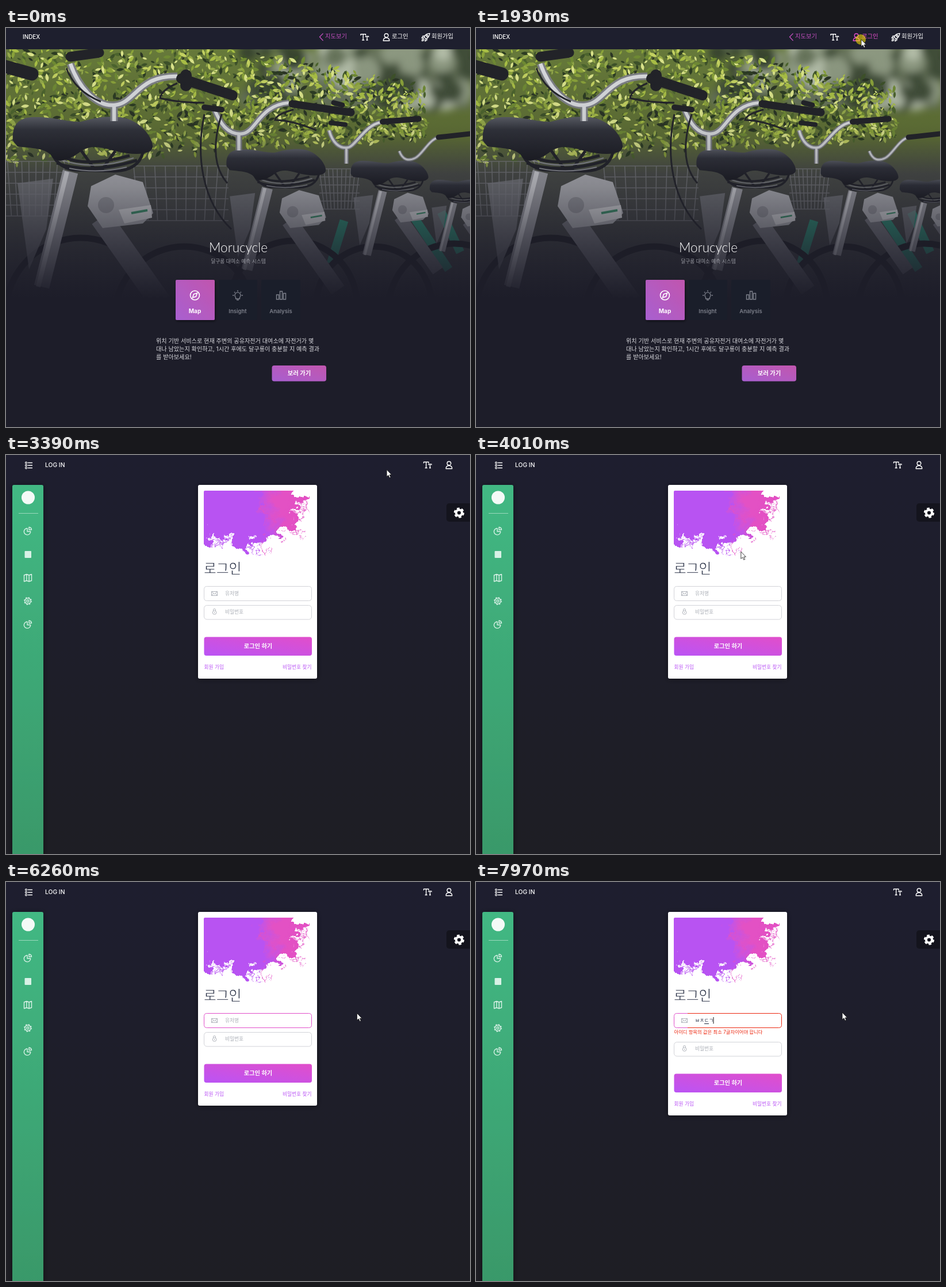
An HTML page for the animation above (8 s loop, 807 px wide and 694 px high).

```html
<!DOCTYPE html>
<html lang="ko">
<head>
<meta charset="utf-8">
<style>
html, body { margin: 0; width: 100%; height: 100%; overflow: hidden; background: #1e1e28; }
svg { display: block; width: 807px; height: 694px; }
text { font-family: Inter, "Noto Sans CJK KR", "Noto Sans CJK", sans-serif; white-space: pre; }
.icon { fill: none; stroke: currentColor; stroke-width: 1.4; stroke-linejoin: round; }
</style>
</head>
<body>
<svg id="stage" viewBox="0 0 807 694">
<defs>
  <linearGradient id="page" x2="0" y2="1"><stop stop-color="#1e1e2f"/><stop offset="1" stop-color="#1e1e24"/></linearGradient>
  <linearGradient id="side" gradientUnits="userSpaceOnUse" x1="0" y1="52" x2="0" y2="790"><stop stop-color="#42b883"/><stop offset="1" stop-color="#389466"/></linearGradient>
  <linearGradient id="bright" y1="1" x2="1" y2="0"><stop stop-color="#ba54f5"/><stop offset="1" stop-color="#e14eca"/></linearGradient>
  <linearGradient id="soft" y1="1" x2="1" y2="0"><stop stop-color="#a85fd0"/><stop offset="1" stop-color="#c156ae"/></linearGradient>
  <linearGradient id="ink" gradientUnits="userSpaceOnUse" x1="438" y1="110" x2="478" y2="98"><stop stop-color="#b853f2"/><stop offset="1" stop-color="#e351c4"/></linearGradient>
  <linearGradient id="hedge" x2="0" y2="1"><stop stop-color="#66793a"/><stop offset=".35" stop-color="#5f7034"/><stop offset=".5" stop-color="#4b4e48"/><stop offset="1" stop-color="#393a40"/></linearGradient>
  <linearGradient id="fade" x2="0" y2="1">
    <stop stop-color="#1d1d29" stop-opacity="0"/><stop offset=".3" stop-color="#1d1d29" stop-opacity=".08"/>
    <stop offset=".55" stop-color="#1d1d29" stop-opacity=".32"/><stop offset=".8" stop-color="#1d1d29" stop-opacity=".72"/>
    <stop offset="1" stop-color="#1d1d29"/>
  </linearGradient>
  <linearGradient id="seatTone" x2="0" y2="1"><stop stop-color="#5b5e66"/><stop offset=".3" stop-color="#30323a"/><stop offset="1" stop-color="#1a1b21"/></linearGradient>
  <filter id="blur"><feGaussianBlur stdDeviation="7"/></filter>
  <filter id="shadow" x="-30%" y="-30%" width="160%" height="160%"><feDropShadow dx="0" dy="1" stdDeviation="5" flood-opacity=".45"/></filter>
  <filter id="lift" x="-20%" y="-20%" width="140%" height="140%"><feDropShadow dx="1" dy="2" stdDeviation="2" flood-opacity=".5"/></filter>
  <filter id="ragged" x="-20%" y="-20%" width="140%" height="140%">
    <feTurbulence type="fractalNoise" baseFrequency=".055" numOctaves="4" seed="8"/>
    <feDisplacementMap in="SourceGraphic" scale="48" xChannelSelector="R" yChannelSelector="G"/>
  </filter>
  <clipPath id="photoClip"><path d="M0 37H807V470H0z"/></clipPath>
  <clipPath id="inkClip"><path d="M344 64q0-2 2-2H528V177H344z"/></clipPath>

  <g id="type" class="icon"><path d="M-6.5-3v-2.2H2V-3M-2.3-5V5M-4.3 5h4M2 0v-1.6h5V0M4.5-1.6V5M3 5h3"/></g>
  <g id="person" class="icon"><circle cy="-3" r="3.3"/><path d="M-5.3 6.3C-5.3 2.5-3 1 0 1S5.3 2.5 5.3 6.3z"/></g>
  <g id="rocket" class="icon"><path d="M-3-.5C0-5.500 3-6.500 7-6.500 6.500-2.500 5 1 .5 3zM-2-2h-3L-7 1.500l4-.5M2 2v3L-1 7l.5-3.500M-3.500 3c-2 0-3 1.500-3 3.500 2 0 3.500-1 3.500-3"/><circle cx="2.500" cy="-2" r="1.500"/></g>
  <g id="pie" class="icon"><path d="M-1-4.5A5.7 5.7 0 1 0 4.7 1H-1zM2-6.5A5 5 0 0 1 6.5-2H2z"/></g>
  <g id="fold" class="icon"><path d="M-6.5-4.5-2.2-6 2.1-4.5 6.5-6V5L2.1 6.5-2.2 5-6.5 6.5zM-2.2-6V5M2.1-4.5v11"/></g>
  <g id="cog" class="icon"><circle r="2"/><circle r="5"/><circle r="6.2" stroke-dasharray="2.4 2.47"/></g>
  <g id="gear" fill="none" stroke="#fff"><circle r="5.1" stroke-width="4"/><circle r="7.6" stroke-width="3" stroke-dasharray="4.5 3.46"/></g>

  <g id="seat">
    <path d="M75 205q10 38 45 42l70 2q40-2 48-32M95 222q40 22 120 0M88 235q60 20 140-5M130 212l25 35M190 214l-25 35" fill="none" stroke="#222329" stroke-width="5"/>
    <path d="M92 228q60 22 130-2M110 244q50 10 100-2" fill="none" stroke="#8d8f95" stroke-width="2"/>
    <path fill="url(#seatTone)" d="M12 196C10 170 20 157 45 155 85 154 100 163 130 163 160 154 190 151 212 158 240 168 257 195 255 208 250 222 220 221 190 214 160 206 150 204 132 213 112 229 92 236 82 226 72 208 42 209 20 206Z"/>
  </g>
  <g id="frame">
    <path d="M165 330 285 500" stroke="#7c7d83" stroke-width="38"/>
    <path d="M112 250 62 450" stroke="#a4a5aa" stroke-width="27"/><path d="M106 250 56 450" stroke="#dcdde0" stroke-width="8"/>
    <path d="M20 270 82 262 70 350 40 420z" fill="#87888e" opacity=".7"/>
    <path d="M148 275 190 255 238 268 256 322 238 340 168 348 142 310z" fill="#b9babe"/>
    <path d="M196 316 252 308 254 330 206 340z" fill="#e6e7e8"/><path d="M218 322l28-5" stroke="#3f9b70" stroke-width="4"/>
    <circle cx="174" cy="308" r="14" fill="#9a9ba0"/>
  </g>
</defs>
<rect width="807" height="694" fill="url(#page)"/>
<g id="home"></g>
<g id="login"></g>
<circle id="click" r="9" fill="#ffe900" fill-opacity=".55"/>
<path id="arrow" d="M0 0V12.3L2.9 9.7 4.9 14.2 6.9 13.3 5 9H8.6Z" fill="#fff" stroke="#111" stroke-width=".8"/>
<path id="beam" d="M-2.5-5.5H-.7L0-5 .7-5.5H2.5M0-5V5M-2.5 5.5H-.7L0 5 .7 5.5H2.5" fill="none" stroke="#222"/>
</svg>
<script>
const $ = id => document.getElementById(id);
let seed = 7;
const rnd = () => (seed = seed * 16807 % 2147483647) / 2147483647;
const range = (a, b) => a + (b - a) * rnd();
const pick = list => list[rnd() * list.length | 0];
const many = (n, make) => Array.from({ length: n }, make).join('');
const text = (x, y, size, str, fill = '#fff', more = '') =>
  `<text x="${x}" y="${y}" font-size="${size}" fill="${fill}" ${more}>${str}</text>`;
const box = (x, y, w, h, r, fill, more = '') =>
  `<rect x="${x}" y="${y}" width="${w}" height="${h}" rx="${r}" fill="${fill}" ${more}/>`;
const icon = (id, x, y, color = '#fff') =>
  `<use href="#${id}" transform="translate(${x} ${y})" color="${color}"/>`;
const line = (d, color, width, more = '') =>
  `<path d="${d}" fill="none" stroke="${color}" stroke-width="${width}" ${more}/>`;
const MID = 'text-anchor="middle"', BOLD = 'text-anchor="middle" font-weight="700"';

// Row of parked bikes in front of a hedge
const SHADE = ['#2c3c22', '#3d5129', '#4c642d', '#2a3424'];
const LIGHT = ['#a9bf45', '#c3d160', '#8aa23a', '#6f8a34', '#dbe48a', '#94a94a'];
const BLUR = ['#39442f', '#66735a', '#8c9880', '#414d37', '#b3bda8'];
const leaf = colors => {
  const x = range(-10, 730), top = 37 + Math.max(0, x - 400) * .2;
  const y = range(top, 235 - x * .06), s = range(3, 8);
  return `<path d="M0 0Q${s} ${-s * .8} ${2 * s} 0 ${s} ${s * .8} 0 0" fill="${pick(colors)}"
    transform="translate(${x} ${y}) rotate(${range(0, 360)})"/>`;
};
const blob = () => `<circle cx="${range(420, 807)}" cy="${range(30, 130)}" r="${range(10, 26)}" fill="${pick(BLUR)}"/>`;
const tube = (d, w) => line(d, '#7d7f85', w) + line(d, '#d8dadd', w * .5);
const grip = (d, w) => line(d, '#222328', w, 'stroke-linecap="round"');
const basket = (x, y, w, h) => {
  let d = '';
  for (let i = 0; i <= 9; i++) d += `M${x + w * i / 9} ${y}l${(4.5 - i) * 2} ${h}`;
  for (let i = 0; i <= 5; i++) d += `M${x} ${y + h * i / 5}h${w}`;
  return line(d, '#85878b', 1.6, 'opacity=".7"');
};
const wheel = ([x, y, r]) => `<circle cx="${x}" cy="${y}" r="${r}" fill="none" stroke="#1c1d22" stroke-width="11"/>`;
const BIKES = ['732 199) scale(.42)', '593 145) scale(.555)', '375 101) scale(.71)', '0 0)'];
const photo = `<g clip-path="url(#photoClip)">
  ${box(0, 37, 807, 433, 0, 'url(#hedge)')}
  <g filter="url(#blur)">${box(540, 30, 267, 110, 0, '#66725a')}${many(80, blob)}</g>
  ${many(700, () => leaf(SHADE))}${many(1300, () => leaf(LIGHT))}
  ${basket(-10, 232, 112, 95)}${basket(222, 240, 165, 95)}${basket(545, 245, 70, 70)}
  ${line('M588 335 565 410M690 300 770 420M757 320 790 390', '#2d967a', 15)}
  ${[[130, 495, 130], [310, 500, 120], [500, 480, 110], [640, 480, 100], [780, 490, 115]].map(wheel).join('')}
  ${BIKES.map(at => `<g transform="translate(${at}"><use href="#frame"/><use href="#seat"/></g>`).join('')}
  ${tube('M112 62C125 100 155 138 190 134S230 82 298 84M188 132V162', 13)}
  ${tube('M362 140C372 165 385 186 410 184S440 134 492 130M405 183V213', 11)}
  ${tube('M562 178C568 200 580 210 594 208S625 168 652 164M592 207V236', 8)}
  ${tube('M684 214C690 230 700 232 712 226S735 195 752 190', 6)}
  ${grip('M-5 66 45 80', 23)}${grip('M112 50 162 43', 17)}${grip('M305 88 394 117', 18)}${grip('M313 82V100', 20)}
  ${grip('M345 138 375 142', 10)}${grip('M498 132 600 147', 13)}${grip('M570 130 585 134', 9)}
  ${grip('M655 163 718 158', 10)}${grip('M565 165 590 168', 8)}${grip('M752 190 807 184', 9)}
  ${line('M298 96Q270 108 268 122 300 130 345 130M105 70Q120 110 165 128M345 150C330 220 340 300 392 350M375 150Q350 230 385 270M500 142Q470 150 468 160 495 160 540 178', '#24252a', 3)}
  ${box(0, 37, 807, 434, 0, 'url(#fade)')}
</g>`;

const INK = '#d9d9de', DIM = '#7d808b';
$('home').innerHTML = box(0, 37, 807, 657, 0, '#1d1d29') + photo + box(0, 0, 807, 37, 0, '#1e1f2e') +
  text(29, 19, 9.9, 'INDEX', '#fff', 'font-weight="500"') +
  line('M551.5 9.5 545.5 15.5 551.5 22', '#c44fc0', 1.3) + text(555, 18, 10.3, '지도보기', '#c44fc0') +
  icon('type', 623.5, 16) + `<g id="hover">${icon('person', 661.5, 16, 'inherit')}${text(671, 18, 10.4, '로그인', 'currentColor')}</g>` +
  icon('rocket', 730, 16) + text(740, 18, 10.3, '회원가입') +
  text(404, 390, 22.5, 'Morucycle', '#fff', MID + ' font-weight="300" style="font-family:Lato,sans-serif"') +
  text(404, 408.5, 8.7, '달구롱 대여소 예측 시스템', '#9a9ba3', MID) +
  box(295, 438, 68, 70, 2, 'url(#soft)', 'filter="url(#lift)"') +
  box(370, 438, 67, 70, 2, '#1a1e2a') + box(444, 438, 68, 70, 2, '#1a1e2a') +
  line('M320.5 465a8 8 0 1 0 16 0 8 8 0 1 0-16 0zM332.5 461 330.5 467 324.5 469 326.5 463z', '#fff', 1.6) +
  line('M399.5 468.5A5 5 0 1 1 406.5 468.5V471H399.5zM401 473h4M403 456v2.5M394 465h2.5M409.5 465h2.5M397 459l1.5 1.5M409 459l-1.5 1.5', DIM, 1.3) +
  line('M470.5 464h4v8h-4zM476.5 458h4v14h-4zM482.5 461.5h4v10.5h-4z', DIM, 1.4) +
  text(328.5, 496, 10, 'Map', '#fff', BOLD) +
  text(403, 496, 9.5, 'Insight', DIM, MID + ' font-weight="600"') +
  text(478, 496, 9.5, 'Analysis', DIM, MID + ' font-weight="600"') +
  text(261, 547.5, 10.13, '위치 기반 서비스로 현재 주변의 공유자전거 대여소에 자전거가 몇', INK) +
  text(261, 561.5, 10.13, '대나 남았는지 확인하고, 1시간 후에도 달구롱이 충분할 지 예측 결과', INK) +
  text(261, 576, 10.13, '를 받아보세요!', INK) +
  box(462.5, 587, 94.5, 27.5, 4, 'url(#soft)') + text(510, 604, 10.3, '보러 가기', '#fff', BOLD);

// Login page
const MINT = '#d8f1e6', GREY = '#a9adb5', EDGE = [210, 211, 216], PINK = [225, 78, 202], RED = [236, 37, 13], WHITE = [255, 255, 255];
const tendril = () => {
  const x = range(350, 505), y = x < 450 ? range(125, 150) : range(75, 140);
  return line(`M${x} ${y}q${range(-8, 14)} ${range(5, 14)} ${range(-10, 26)} ${range(0, 26)}`,
    x < 445 ? '#b853f2' : '#e351c4', range(.6, 2.5), 'opacity=".7"');
};
$('login').innerHTML = box(0, 0, 807, 694, 0, 'url(#page)') +
  line('M38 13.5H46M38 18H46M38 22.5H46', '#fff', 1.5) +
  line('M35 12a1.5 1.5 0 1 0 .1 0M35 16.5a1.5 1.5 0 1 0 .1 0M35 21a1.5 1.5 0 1 0 .1 0', '#fff', 1.2) +
  text(68, 20.5, 10.3, 'LOG IN', '#fff', 'font-weight="500"') + icon('type', 733, 17.5) + icon('person', 770.5, 17.5) +
  box(11, 52, 54, 720, 3, 'url(#side)', 'filter="url(#shadow)"') +
  '<circle cx="38.5" cy="74" r="11.5" fill="#f4faf7"/>' + line('M22 101.5H56', '#9bd8bc', 1) +
  icon('pie', 38, 132, MINT) + box(32.5, 167, 11.5, 12, 1, MINT) + icon('fold', 38, 213.5, MINT) +
  icon('cog', 38, 254, MINT) + icon('pie', 38, 294.5, MINT) +
  box(766, 84, 50, 32, 5, '#14141d') + icon('gear', 788, 100.5) +
  box(334, 52, 207, 337, 3, '#fff', 'id="card" filter="url(#shadow)"') +
  `<g clip-path="url(#inkClip)"><g filter="url(#ragged)">
    <path fill="url(#ink)" d="M430 40H494L500 74 530 74 522 88 500 96 512 106 500 118 498 132 478 128 466 140 445 148 430 130z"/>
    <path fill="#b853f2" d="M320 40H440L436 78 450 96 442 118 446 146 430 152 412 166 396 160 388 140 372 148 362 130 352 150 320 148z"/>
    ${many(60, tendril)}</g></g>` +
  text(344, 206, 23.7, '로그인', '#1d253b', 'font-weight="100" stroke="#fff" stroke-width=".6"') +
  line('M368 228.5H526.5Q531.5 228.5 531.5 233.5V248.5Q531.5 253.5 526.5 253.5H368', '', 1, 'id="field"') +
  line('M368 228.5H349.5Q344.5 228.5 344.5 233.5V248.5Q344.5 253.5 349.5 253.5H368', '', 1, 'id="fieldIcon"') +
  line('M357.5 237.5h10v7h-10zl5 4.5 5-4.5M357.5 244.5l3.5-4M367.5 244.5l-3.5-4', GREY, .9) +
  text(381, 243.5, 8.7, '유저명', GREY, 'id="hint"') + text(381, 244, 8.7, '', '#222a42', 'id="typed"') +
  box(0, 246, 8, 1, 0, '#222a42', 'id="underline"') + box(0, 235, 1, 11.5, 0, '#111', 'id="caret"') +
  text(344.5, 263.5, 8.3, '아이디 항목의 값은 최소 7글자이어야 합니다', '#ec250d', 'id="error"') +
  '<g id="lower">' + box(344.5, 261.5, 187, 24.5, 5, 'none', `stroke="rgb(${EDGE})"`) +
  line('M360.5 271v-1.5a2 2 0 0 1 4 0V271M359.3 274a3.3 3.3 0 1 0 6.6 0 3.3 3.3 0 1 0-6.6 0M362.6 273v2', GREY, .9) +
  text(381, 275.5, 8.7, '비밀번호', GREY) + box(344.5, 316.5, 187.5, 32.5, 4, 'url(#bright)') +
  text(438.5, 335.5, 10.2, '로그인 하기', '#fff', BOLD) +
  text(344.5, 371.5, 8.7, '회원 가입', '#ba54f5') + text(531.5, 371.5, 8.7, '비밀번호 찾기', '#ba54f5', 'text-anchor="end"') + '</g>';

const PATH = [[460, 782, 700], [700, 760, 520], [950, 715, 230], [1150, 685, 80], [1300, 671, 32], [1580, 670, 20],
  [3320, 670, 20], [3500, 650, 34], [3800, 535, 115], [4010, 461, 168], [4150, 437, 188], [4560, 412, 240],
  [5700, 412, 240], [5850, 440, 238], [6150, 590, 230], [6400, 636, 226], [7430, 636, 226], [7500, 637, 227]];
const KEYS = [[0, ''], [6330, 'ㅂ'], [6470, 'ㅂㅈ'], [6540, 'ㅂㅈㄷ'], [6680, 'ㅂㅈㄷㄱ'], [6970, 'ㅂㅈㄷㄱㅅ'], [7970, 'ㅂㅈㄷㄱ']];

const clamp = v => Math.min(1, Math.max(0, v));
const mix = (a, b, k) => `rgb(${a.map((v, i) => Math.round(v + (b[i] - v) * clamp(k)))})`;
const set = (id, attrs) => { for (const k in attrs) $(id).setAttribute(k, attrs[k]); };
const show = (id, on) => { $(id).style.display = on ? '' : 'none'; };
const pointer = t => {
  const i = PATH.findIndex(p => p[0] > t);
  if (i <= 0) return PATH[i ? PATH.length - 1 : 0].slice(1);
  const a = PATH[i - 1], b = PATH[i], k = (t - a[0]) / (b[0] - a[0]);
  return [a[1] + (b[1] - a[1]) * k, a[2] + (b[2] - a[2]) * k];
};

function draw(t) {
  const login = t >= 2000, error = t >= 6330, focus = t >= 5640;
  show('home', !login);
  show('login', login);
  set('hover', { color: mix(WHITE, PINK, (t - 1400) / 150) });

  const [x, y] = pointer(t), beam = login && y > 228 && x < 531;
  show('arrow', t >= 530 && !beam);
  show('beam', beam);
  set('arrow', { transform: `translate(${x} ${y})` });
  set('beam', { transform: `translate(${x} ${y})` });
  show('click', (t >= 1860 && !login) || (focus && t < 5770));
  set('click', { cx: x - 1, cy: y });

  const [typedAt, typed] = KEYS.filter(k => k[0] <= t).pop(), n = typed.length;
  $('typed').textContent = typed;
  show('hint', !n);
  show('underline', n);
  set('underline', { x: 373 + 8 * Math.min(n, 3) });
  show('caret', focus && (t - (n ? typedAt : 5640)) % 1000 < 490);
  set('caret', { x: 380.5 + 8 * n });

  const lit = (t - 5650) / 300;
  set('fieldIcon', { stroke: mix(EDGE, PINK, lit) });
  set('field', { stroke: error ? mix(PINK, RED, (t - 6330) / 300) : mix(EDGE, PINK, lit) });
  show('error', error);
  set('lower', { transform: `translate(0 ${error ? 17 : 0})` });
  set('card', { height: error ? 354 : 337 });
}
const start = performance.now();
(function tick() {
  draw((performance.now() - start) % 8000);
  requestAnimationFrame(tick);
})();
</script>
</body>
</html>
```
